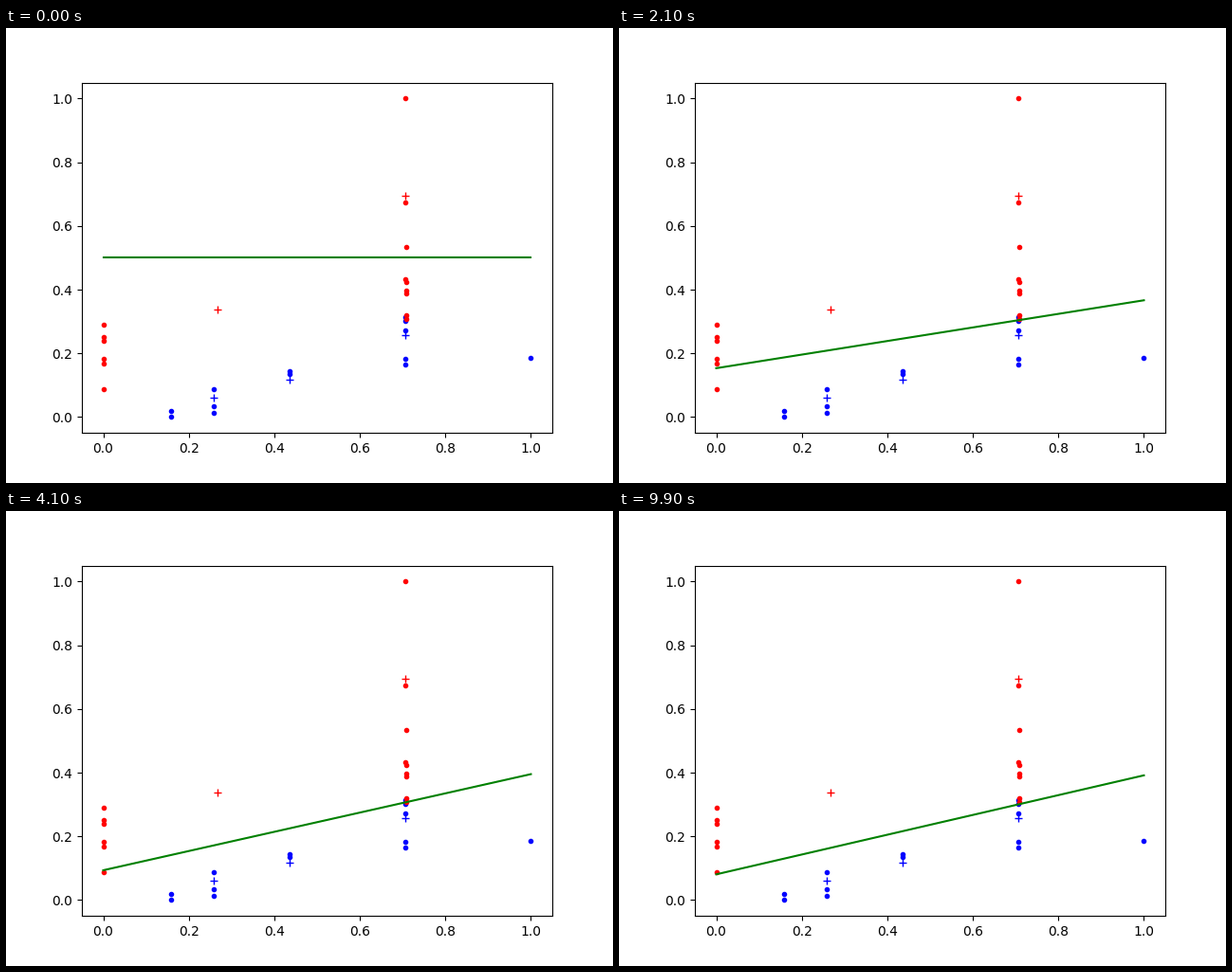
Animation of 640 by 480 pixels, one loop 10 s. Source, as a matplotlib script:

```python
import numpy as np
import matplotlib.pyplot as plt
from matplotlib.animation import FuncAnimation

FRAMES, INTERVAL = 100, 100

# Heights of the samples in each column x: dots for training, crosses for tests
SAMPLES = {
    "b.": {0.158: [0, 0.019], 0.258: [0.013, 0.034, 0.088],
           0.436: [0.134, 0.143], 1: [0.185],
           0.7068: [0.165, 0.183, 0.272, 0.302, 0.314]},
    "r.": {0: [0.087, 0.168, 0.183, 0.240, 0.251, 0.290],
           0.7068: [0.432, 0.674, 1],
           0.709: [0.309, 0.320, 0.389, 0.397, 0.424, 0.534]},
    "b+": {0.258: [0.060], 0.436: [0.117], 0.7068: [0.257]},
    "r+": {0.267: [0.338], 0.7068: [0.695]},
}

# The boundary drops quickly from START, then drifts evenly between turns
START = 0.5
TURNS = [0, 10, 16, 27, 36, 45]
LEFT = [0.265, 0.202, 0.1657, 0.1385, 0.1095, 0.0807]
RIGHT = [0.197, 0.312, 0.352, 0.384, 0.400, 0.3915]


def height(step, drift):
    drop = (START - drift[0]) * np.exp(-step)
    return np.interp(step, TURNS, drift) + drop


fig, ax = plt.subplots(figsize=(6.4, 4.8), dpi=100)
ax.set(xlim=(-0.05, 1.05), ylim=(-0.05, 1.05))
for style, columns in SAMPLES.items():
    for x, heights in columns.items():
        ax.plot([x] * len(heights), heights, style)
boundary, = ax.plot([0, 1], [START, START], "g-")


def update(step):
    boundary.set_ydata([height(step, LEFT), height(step, RIGHT)])
    return boundary,


anim = FuncAnimation(fig, update, frames=FRAMES, interval=INTERVAL,
                     repeat=True, repeat_delay=0)
plt.show()
```
